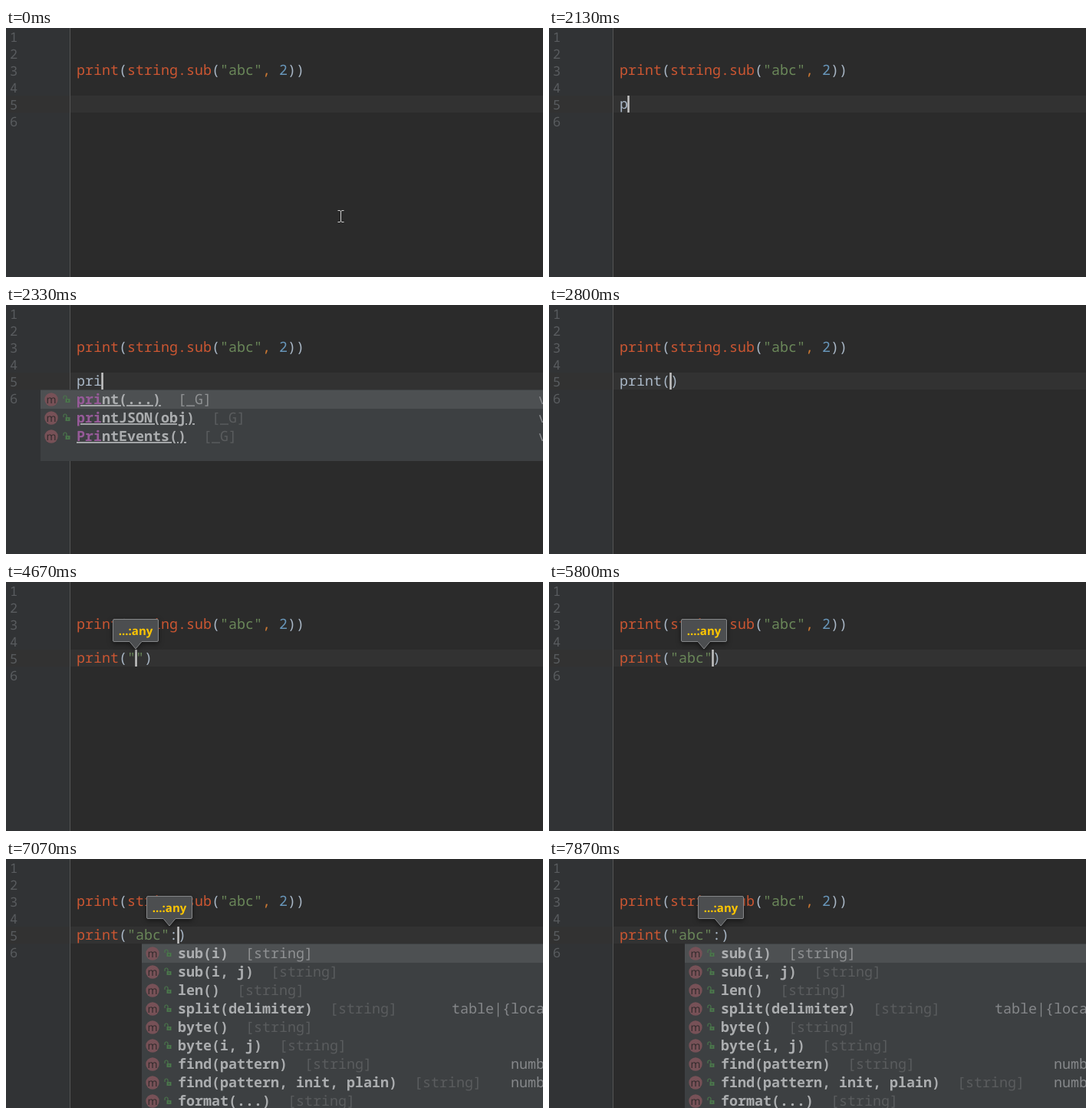
An HTML page that plays this animation: 700 by 324 pixels, repeating every 8 s.

```html
<!DOCTYPE html>
<html lang="en">
<head>
<meta charset="utf-8">
<title>Code completion</title>
<style>
html, body { margin: 0; width: 100%; height: 100%; overflow: hidden; background: #2b2b2b; }
svg { display: block; }
text {
  font: 18.333px "Noto Sans Mono", "DejaVu Sans Mono", monospace;
  white-space: pre;
  text-rendering: geometricPrecision;
  fill: #a9b7c6;
}
.num { font-size: 17px; fill: #595c5f; }
.fn { fill: #cb5632; }
.str { fill: #6a8759; }
.int { fill: #6897bb; }
.sep { fill: #cc7832; }
.name { font-weight: 700; fill: #abadaf; }
.link { text-decoration: underline; text-decoration-thickness: 1.3px; }
.hit { fill: #965a98; }
.tag { fill: #5a5c5e; }
.tag.sel { fill: #8f9193; }
.type { fill: #85878a; }
.dots { font-size: 8px; fill: #77797b; }
.badge { font: 14px "Open Sans", sans-serif; fill: #2f2a2b; text-anchor: middle; }
.hint { font: 700 15px "Open Sans", "Noto Sans", sans-serif; fill: #ffc600; text-anchor: middle; }
#tip { filter: drop-shadow(0 2px 3px rgba(0, 0, 0, .5)); }
</style>
</head>
<body>
<svg id="stage" width="700" height="324" viewBox="0 0 700 324">
  <rect width="700" height="324" fill="#2b2b2b"/>
  <rect width="83" height="324" fill="#313335"/>
  <rect y="88" width="700" height="22" fill="#323232"/>
  <rect x="83" width="1" height="324" fill="#555"/>
  <g id="nums"></g>
  <text id="line3" x="92" y="61"></text>
  <text id="line5" x="92" y="105"></text>
  <rect id="caret" y="88" width="2.5" height="22" fill="#c4c4c4"/>
  <g id="popups"></g>
  <g id="tip">
    <path d="M-28 48.5H28Q29.5 48.5 29.5 50V76Q29.5 77.5 28 77.5H8L0 87L-8 77.5H-28Q-29.5 77.5 -29.5 76V50Q-29.5 48.5 -28 48.5Z" fill="#4c4e50" stroke="#858789"/>
    <text class="hint" y="69">...:any</text>
  </g>
  <path id="beam" d="M-3.5 -7.5H-1L.5 -6.5L2 -7.5H4.5M.5 -6.5V6.5M-3.5 7.5H-1L.5 6.5L2 7.5H4.5" fill="none" stroke="#d0d0d0"/>
  <path id="arrow" d="M.5 .5V15L4 11.8L6.3 17L8.5 16L6.2 11H11Z" fill="#fff" stroke="#222"/>
</svg>
<script>
const LOOP = 8000, COL = 11, LEFT = 92, ROW = 24;
const el = id => document.getElementById(id);
const show = (node, on) => node.setAttribute("display", on ? "inline" : "none");
const move = (node, x, y) => node.setAttribute("transform", `translate(${x} ${y})`);
const span = (cls, s) => `<tspan class="${cls}">${s}</tspan>`;
const text = (cls, x, y, s) => `<text class="${cls}" x="${x}" y="${y}">${s}</text>`;

const rules = [["fn", /^(print|string\.sub)$/], ["str", /^"/], ["int", /^\d/], ["sep", /^,/]];
const paint = code => code.replace(/print|string\.sub|"[^"]*"?|\d+|,/g,
  s => span(rules.find(([, re]) => re.test(s))[0], s));

// Rows: kind, name with *matched* parts, tag, type, type x
const lists = {
  pr: [
    ["m", "*pr*int(...)", "[_G]", "void", 694],
    ["m", "*pr*intJSON(obj)", "[_G]", "void", 694],
    ["m", "*Pr*intEvents()", "[_G]", "void", 694],
    ["f", "*Pr*unk6w", "[_G]", "{global Prunk6w}|Prunk6w", 475],
    ["f", "*P*article*R*enderer", "[_G]", "{global ParticleRenderer}", 464],
    ["m", "add*Pr*otoHandler(id, handler, obj)", "[_G]"],
    ["m", "remove*Pr*otoHandler(id, handler)", "[_G]"],
    ["f", "Player*Pr*efs", "..", "{global PlayerPrefs}|AmberKettle.PlayerPrefs", 255],
    ["f", "UI*Pr*ogressBar", "[_G]", "{global UIProgressBar}|UIProgressBar", 343]
  ],
  sub: [
    ["m", "sub(i)"], ["m", "sub(i, j)"], ["m", "len()"],
    ["m", "split(delimiter)", "", "table|{local", 581],
    ["m", "byte()"], ["m", "byte(i, j)"],
    ["m", "find(pattern)", "", "number", 658],
    ["m", "find(pattern, init, plain)", "", "number", 658],
    ["m", "format(...)"]
  ]
};
lists.pri = lists.pr.slice(0, 3).map(([k, n, ...rest]) => [k, n.replace(/r\*i/, "ri*"), ...rest]);

function drawRow([kind, name, tag, type, typeX], i, x, linked) {
  const cy = 123 + i * ROW, base = cy + 6, tx = x + 47;
  const end = tx + name.replace(/\*/g, "").length * COL;
  const label = name.replace(/\*(\w+)\*/g, (_, s) => span("hit", s));
  const tagClass = tag === ".." ? "dots" : i ? "tag" : "tag sel";
  return `<circle cx="${x + 14}" cy="${cy}" r="8.7" fill="${kind === "m" ? "#775157" : "#806538"}"/>`
    + text("badge", x + 14, cy + 4.5, kind)
    + `<path d="M${x + 30} ${cy - 1}V${cy - 3}a2 2 0 0 1 4 0V${cy}" fill="none" stroke="#4a754b" stroke-width="1.2"/>`
    + `<rect x="${x + 32.5}" y="${cy - 1}" width="6" height="5" fill="#4a754b"/>`
    + `<rect x="${x + 35}" y="${cy + .5}" width="1" height="2" fill="#3c3f41"/>`
    + text(linked && kind === "m" ? "name link" : "name", tx, base, label)
    + text(tagClass, end + 22, base, tag || "[string]")
    + (type ? text("type", typeX, base, type) : "");
}

function drawPopup(id, x, height) {
  const linked = id !== "sub";
  return `<g id="${id}"><rect x="${x}" y="110" width="${700 - x}" height="${height}" fill="#3d4042"/>`
    + `<rect x="${x}" y="111" width="${700 - x}" height="${ROW}" fill="#4d5052"/>`
    + lists[id].map((r, i) => drawRow(r, i, x, linked)).join("") + "</g>";
}

el("nums").innerHTML = [1, 2, 3, 4, 5, 6].map(n => text("num", 5, n * 22 - 4.5, n)).join("");
el("line3").innerHTML = paint('print(string.sub("abc", 2))');
el("popups").innerHTML = drawPopup("pr", 45, 214) + drawPopup("pri", 45, 93) + drawPopup("sub", 177, 214);

// caret and tip are text columns, -1 hides them
const steps = [
  [0, { code: "", lit: false, caret: -1, tip: -1, popup: "" }],
  [800, { caret: 0 }],
  [1800, { caret: -1 }],
  [2070, { caret: 0 }],
  [2130, { code: "p", caret: 1 }],
  [2200, { code: "pr", caret: 2, popup: "pr" }],
  [2270, { code: "pri", caret: 3 }],
  [2330, { popup: "pri" }],
  [2800, { code: "print()", caret: 6, popup: "" }],
  [3130, { lit: true }],
  [3870, { caret: -1, tip: 6 }],
  [4330, { code: 'print(")', caret: 7 }],
  [4400, { code: 'print("")' }],
  [4670, { tip: 7 }],
  [4870, { code: 'print("a")', caret: 8 }],
  [5070, { code: 'print("ab")', caret: 9 }],
  [5200, { code: 'print("abc")', caret: 10 }],
  [5400, { tip: 9 }],
  [5530, { tip: 10 }],
  [5800, { caret: 11 }],
  [6070, { tip: 11 }],
  [6530, { code: 'print("abc".)', caret: 12 }],
  [6670, { code: 'print("abc")', caret: 11 }],
  [6730, { tip: 12 }],
  [6930, { tip: 11 }],
  [7070, { code: 'print("abc":)', caret: 12, popup: "sub" }],
  [7330, { tip: 12 }],
  [7870, { caret: -1 }]
];

const mousePath = [[0, 0], [70, .06], [130, .27], [200, .57], [270, .84], [330, 1]];

function drawMouse(t) {
  const p = mousePath.filter(([at]) => at <= t).pop()[1];
  const x = Math.round(436 - 408 * p), y = Math.round(245 - 151 * p);
  const on = t < 400, gutter = x < 83;
  show(el("beam"), on && !gutter);
  show(el("arrow"), on && gutter);
  move(el(gutter ? "arrow" : "beam"), x, y);
}

let shown = "";
function render(t) {
  const s = Object.assign({}, ...steps.filter(([at]) => at <= t).map(([, change]) => change));
  drawMouse(t);
  const key = JSON.stringify(s);
  if (key === shown) return;
  shown = key;
  el("line5").innerHTML = s.lit ? paint(s.code) : s.code;
  show(el("caret"), s.caret >= 0);
  el("caret").setAttribute("x", Math.max(LEFT, LEFT - .7 + s.caret * COL));
  show(el("tip"), s.tip >= 0);
  move(el("tip"), LEFT + s.tip * COL, 0);
  for (const id in lists) show(el(id), s.popup === id);
}

const start = performance.now();
function tick() {
  render((performance.now() - start) % LOOP);
  requestAnimationFrame(tick);
}
tick();
</script>
</body>
</html>
```
